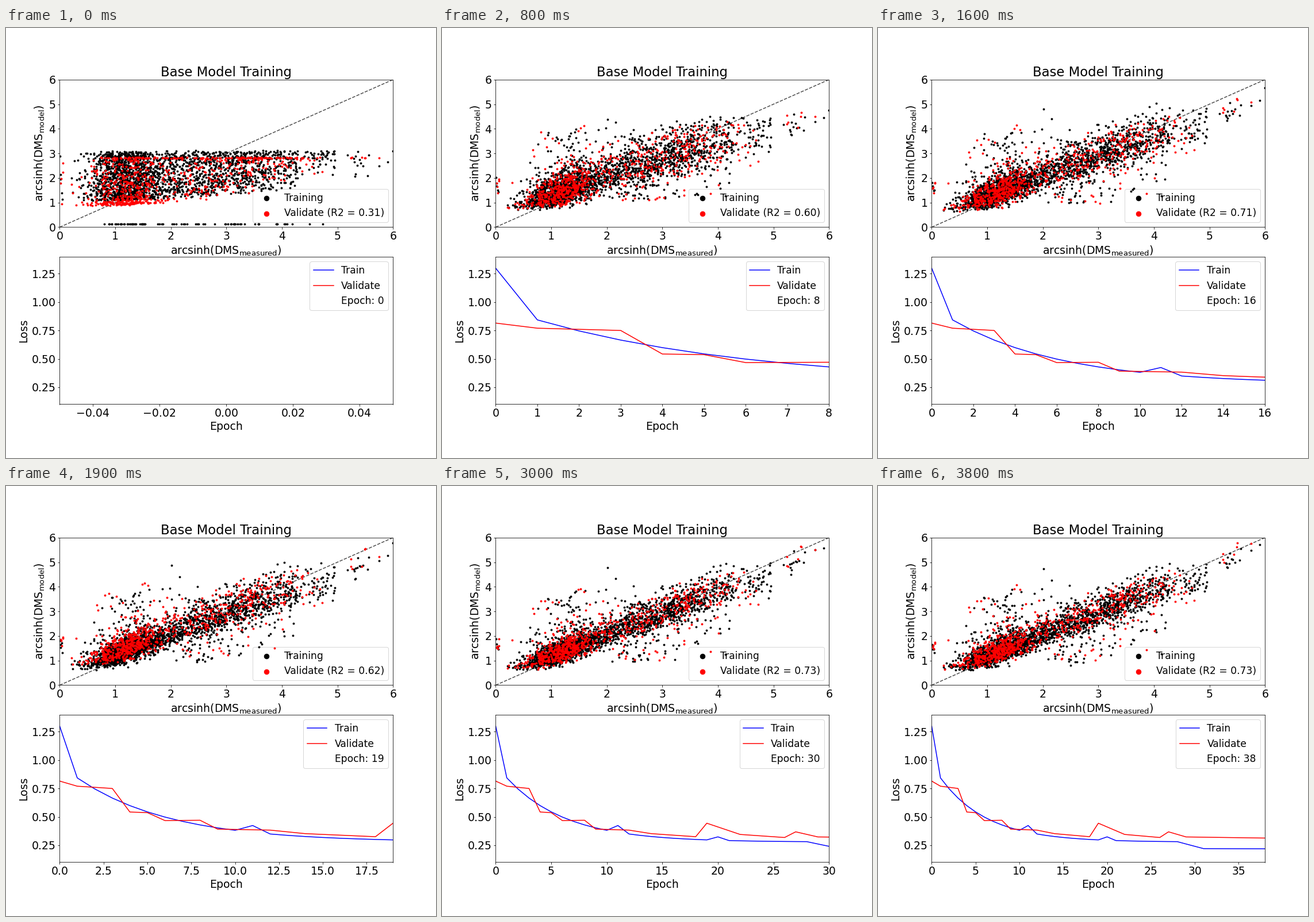
Recreate the animation shown at these times as a matplotlib script. Size 748 by 748 pixels, loop 3900 ms.

```python
import numpy as np
import matplotlib.pyplot as plt
from matplotlib.animation import FuncAnimation

SIDE, DPI, EPOCHS = 748, 72, 39
TEXT, TITLE, LEGEND = 18.9, 22.8, 17.1

plt.rcParams.update({
    "font.family": "DejaVu Sans",
    "font.size": TEXT,
    "axes.titlesize": TITLE,
    "legend.fontsize": LEGEND,
})


def train_loss(epoch):
    """Exponential decay with a last step down and a few bumps."""
    plateau = .06 * np.clip((31 - epoch) / 3, 0, 1)
    loss = .218 + plateau + .565 * np.exp((1 - epoch) / 5.3)
    for at, height in ((0, .338), (11, .06), (20, .03)):
        loss = loss + height * (epoch == at)
    return loss


def valid_loss(epoch):
    """Uneven descent between key epochs."""
    keys = [(0, .815), (1, .77), (3, .75), (4, .5425), (5, .537), (6, .467),
            (8, .47), (9, .392), (12, .383), (14, .352), (18, .325),
            (19, .444), (22, .345), (26, .318), (27, .368), (29, .323),
            (38, .313)]
    return np.interp(epoch, *zip(*keys))


STEPS = np.arange(EPOCHS)
TRAIN, VALID = train_loss(STEPS), valid_loss(STEPS)


def trend(x, cap=None, lift=0):
    """Mean prediction; a low cap flattens the upper end."""
    y = np.sqrt(.42 + .92 * x ** 2) - .6 * np.exp(-((x - 4.85) / .45) ** 2)
    return y if cap is None else cap * np.tanh(y / cap) + lift


def reflect(y, floor):
    return floor + np.abs(y - floor)


class Cloud:
    """Points with fixed x whose y settles on the diagonal over the epochs."""

    def __init__(self, seed, core, wide, far, top, tail, stray):
        rng = np.random.default_rng(seed)
        x = np.concatenate([
            rng.normal(1.12, .31, core),
            1.2 + 3.2 * rng.beta(1.2, 1.7, wide),
            rng.normal(3.3, .55, far),
            rng.uniform(3.9, 4.95, top),
        ])
        x = x[(x > .2) & (x < 5)]
        edge = rng.uniform(0, .06, 5)
        self.x = np.concatenate([x, edge, rng.uniform(5.15, 5.6, tail),
                                 [5.75, 5.9, 6.0][:tail // 4], stray[:1]])
        self.stray = stray[1]
        self.seed = seed
        n = len(self.x)
        self.g = np.clip(rng.normal(0, 1, n), -2.6, 2.6)
        self.rank = 1 / (1 + np.exp(-1.7 * self.g))
        self.fine = rng.normal(0, .02, n)
        self.odd = self.outliers(rng)
        self.stages = [
            self.stage(trend(self.x, 4.3, .2), 1.3, .75, 4.05),
            self.stage(trend(self.x, 7.5, .1), 1.0, .7),
            self.stage(trend(self.x), .78, .6),
        ]

    def outliers(self, rng):
        x, n = self.x, len(self.x)
        up = rng.exponential(.75, n) * (rng.random(n) < .13) * (x < 2.6)
        down = rng.uniform(.3, 1.7, n) * (rng.random(n) < .12)
        down *= (x > 2.1) & (x < 4.4)
        return np.where(x < .1, .9, np.minimum(up, 2.2) - down)

    def stage(self, mean, scale, base, cap=9):
        x, g = self.x, self.g
        spread = np.where(x > 5.1, .22, .17 + .085 * np.minimum(x, 3))
        y = mean + self.odd + scale * spread * g * np.where(g > 0, 1.2, .9)
        floor = base + .1 * x + .35 * np.maximum(x - 3.2, 0)
        y = reflect(y, floor + np.abs(self.fine))
        return np.where(y > cap, cap - np.abs(3 * self.fine), y)

    def y(self, epoch, start):
        if epoch == 0:
            return start
        early, middle, late = self.stages
        if epoch < 4:
            y = start + (early - start) * (epoch / 4) ** .6
        elif epoch < 12:
            y = early + (middle - early) * (epoch - 4) / 8
        else:
            y = middle + (late - middle) * (1 - (1 - (epoch - 12) / 26) ** 2)
        rng = np.random.default_rng([self.seed, epoch])
        y = reflect(y + rng.normal(0, .06, len(y)), .6)
        wobble = .08 * np.sin(1.7 * epoch)
        y[-1] = self.stray
        return y + wobble * ((self.x > 5.1) | (self.x == self.x[-1]))


black = Cloud(4, 1000, 960, 190, 75, tail=13, stray=(4.14, 1.2))
red = Cloud(9, 390, 290, 70, 18, tail=6, stray=(3.87, 1.3))


def start(cloud, base, top, power):
    low = base + .08 * cloud.x
    return low + (top - low) * cloud.rank ** power + cloud.fine


BLACK_START = start(black, 1.0, 3.1, np.clip(1.5 - .25 * black.x, .3, 1.2))
RED_START = start(red, .85, 3.15, 2.8 * np.exp(-.75 * np.abs(red.x - 1)))
RED_START = np.minimum(RED_START, 2.82 + .5 * red.fine)
flat = np.random.default_rng(2).random(len(black.x)) < .036
BLACK_START = np.where(flat, .13 + .1 * black.fine, BLACK_START)

fig, (ax, loss_ax) = plt.subplots(2, 1, figsize=(SIDE / DPI, SIDE / DPI), dpi=DPI)
fig.subplots_adjust(left=.1249, right=.9, bottom=.125, top=.88, hspace=.2)

ax.set(xlim=(0, 6), ylim=(0, 6), title="Base Model Training",
       xlabel=r"arcsinh(DMS$_{\mathrm{measured}}$)",
       ylabel=r"arcsinh(DMS$_{\mathrm{model}}$)")
ax.set_xticks(range(7))
ax.set_yticks(range(7))
ax.plot([0, 6], [0, 6], ls="--", c=".3", lw=1.5, zorder=.8)
train_dots = ax.scatter([], [], s=8, c="black", label="Training")
valid_dots = ax.scatter([], [], s=8, c="red", label="Validate (R2 = 0.31)")
dots_legend = ax.legend(loc="lower right", markerscale=3)
dots_legend.set_zorder(.9)

loss_ax.set(ylim=(.1, 1.4), xlabel="Epoch", ylabel="Loss")
train_line, = loss_ax.plot([], [], c="blue", label="Train")
valid_line, = loss_ax.plot([], [], c="red", label="Validate")
loss_ax.plot([], [], " ", label="Epoch: 0")
loss_legend = loss_ax.legend(loc="upper right")


def update(epoch):
    # Validation points ride high whenever their loss exceeds training
    gap = VALID[epoch] - TRAIN[epoch]
    shift = 2 * max(0, gap - .07) if epoch > 3 else 0
    train_dots.set_offsets(np.column_stack([black.x, black.y(epoch, BLACK_START)]))
    valid_dots.set_offsets(np.column_stack([red.x, red.y(epoch, RED_START) + shift]))

    r2 = 1 - .848 * VALID[epoch]
    dots_legend.get_texts()[1].set_text(f"Validate (R2 = {r2:.2f})")
    loss_legend.get_texts()[2].set_text(f"Epoch: {epoch}")

    shown = slice(epoch + 1)
    train_line.set_data(STEPS[shown], TRAIN[shown])
    valid_line.set_data(STEPS[shown], VALID[shown])
    loss_ax.set_xlim((0, epoch) if epoch else (-.05, .05))
    return train_dots, valid_dots, train_line, valid_line


anim = FuncAnimation(fig, update, frames=EPOCHS, interval=100, repeat=True,
                     repeat_delay=0, blit=False)
plt.show()
```
